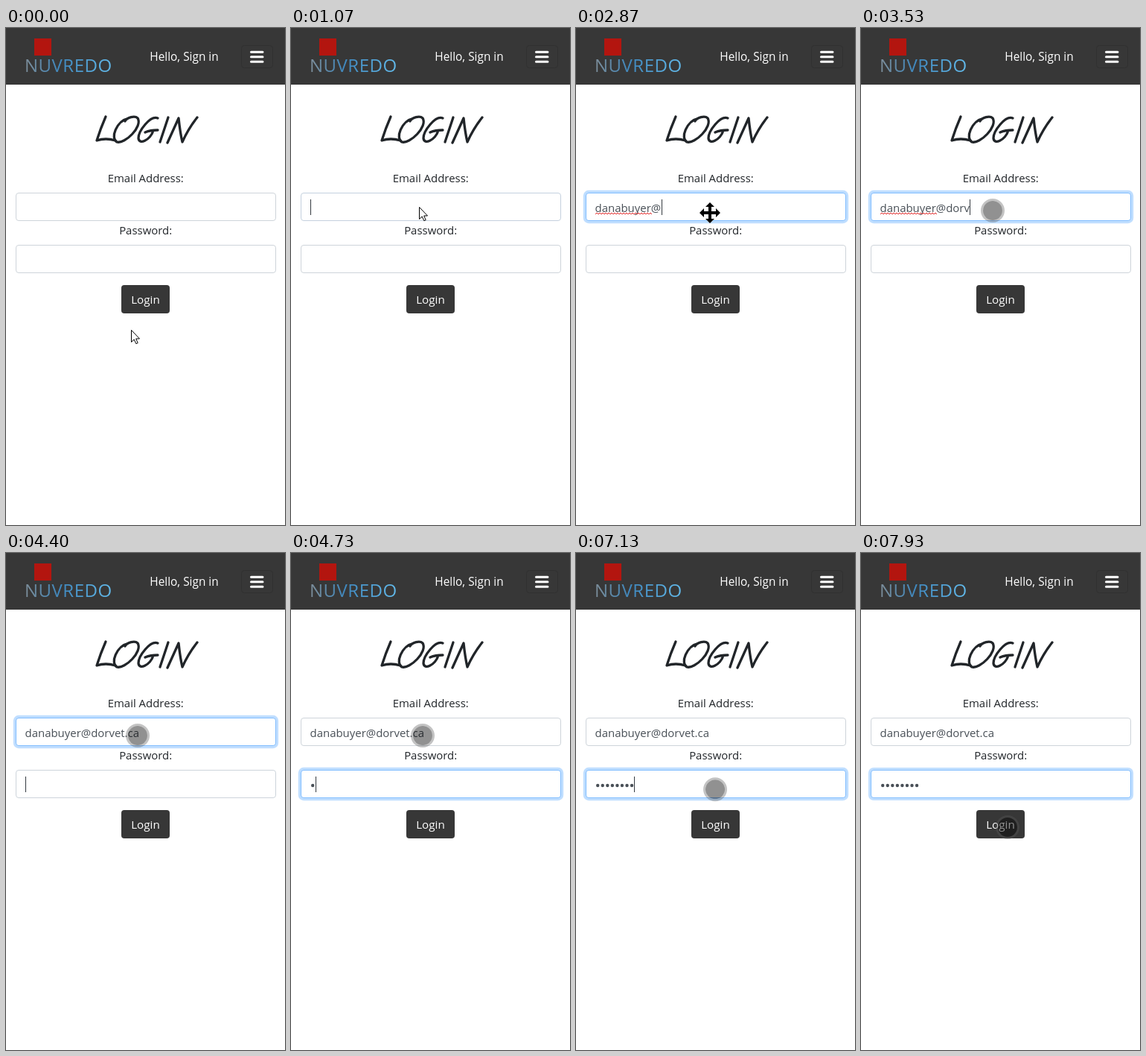
An HTML page that plays this animation: 375x667 px, repeating every 8000 ms.

```html
<!DOCTYPE html>
<html lang="en">
<head>
<meta charset="utf-8">
<title>Login</title>
<style>
  html, body { margin: 0; height: 100%; overflow: hidden; background: #fff; }
  svg { display: block; font: 14.95px "Open Sans", "Noto Sans", sans-serif; fill: #212529; }
  .mid { text-anchor: middle; }
  .light { fill: #fff; }
  .value { fill: #495057; }
  .field { fill: #fff; }
  .ring { fill: none; }
  .title { fill: none; stroke: #212529; stroke-width: 3.3; stroke-linecap: round; stroke-linejoin: round; }
</style>
</head>
<body>
<svg width="375" height="667" viewBox="0 0 375 667">
  <defs>
    <linearGradient id="brand">
      <stop offset="0" stop-color="#7d8d98"/>
      <stop offset=".4" stop-color="#3f87bd"/>
      <stop offset="1" stop-color="#62b9ea"/>
    </linearGradient>
  </defs>

  <rect width="375" height="76" fill="#373737"/>
  <rect x="38" y="14" width="23" height="23" fill="#b3150f"/>
  <text x="25" y="59" font-size="24" letter-spacing=".5" fill="url(#brand)">NUVREDO</text>
  <text class="mid light" x="239.5" y="44" font-size="15.4">Hello, Sign in</text>
  <rect x="316.5" y="23.5" width="42" height="30" rx="4" fill="none" stroke="#303030"/>
  <path d="M329.5 32.3h15.5m-15.5 6.5h15.5m-15.5 6.5h15.5" stroke="#fff" stroke-width="3" stroke-linecap="round"/>

  <g class="title" role="img" aria-label="Login">
    <path d="M134 119Q127 135 122 151Q134 147 147 151"/>
    <path d="M165 121C148 125 140 148 149 153C160 156 184 132 177 121C173 117 163 120 160 125"/>
    <path d="M204 121C194 117 178 138 178 148C179 157 193 151 198 138M187 140Q194 137 204 137"/>
    <path d="M218 120L207 153"/>
    <path d="M217 154L232 121Q234 140 237 153Q245 135 257 120"/>
  </g>

  <text class="mid" x="187.7" y="207">Email Address:</text>
  <text class="mid" x="187.7" y="277">Password:</text>

  <g id="emailBox">
    <rect class="ring" x="13" y="221" width="350" height="38" rx="4"/>
    <rect class="field" x="13.5" y="221.5" width="349" height="37" rx="3.5"/>
  </g>
  <g id="passwordBox">
    <rect class="ring" x="13" y="291" width="350" height="38" rx="4"/>
    <rect class="field" x="13.5" y="291.5" width="349" height="37" rx="3.5"/>
  </g>
  <text id="email" class="value" x="25.5" y="247"></text>
  <path id="squiggle" fill="none" stroke="#e02b2b"/>
  <g id="dots" class="value"></g>
  <rect id="caret" width="1" height="21" fill="#343a40"/>

  <rect x="155" y="345" width="65" height="38" rx="4" fill="#373737"/>
  <text class="mid light" x="187.5" y="370" font-size="15.2">Login</text>

  <path id="arrow" d="M.5 .5V16.5L4.2 13L6.8 18.7L9.2 17.7L6.7 12H11.5Z" fill="#fff" stroke="#000"/>
  <path id="move" transform="translate(180 248)" stroke="#fff" paint-order="stroke" fill="#000"
    d="M0-14L6-8H2V-2H8V-6L14 0L8 6V2H2V8H6L0 14L-6 8H-2V2H-8V6L-14 0L-8-6V-2H-2V-8H-6Z"/>
  <g id="touch">
    <circle r="13" fill="#000" fill-opacity=".43"/>
    <circle r="14.5" fill="none" stroke="#595959" stroke-opacity=".36" stroke-width="3"/>
  </g>
</svg>
<script>
const LOOP = 8000;
const ADDRESS = "danabuyer@dorvet.ca";
const emailKeys = [1530, 1670, 1800, 1930, 2130, 2270, 2330, 2470, 2600, 2800,
  3070, 3400, 3470, 3530, 3670, 3730, 3870, 4000, 4070];
const passwordKeys = [4730, 4870, 5070, 5270, 5470, 5600, 5730, 5930];
const FOCUS_EMAIL = 1040, FOCUS_PASSWORD = 4390, BLUR = 7915;

// Pointer paths: [time, x, y]
const arrowPath = [[30, 168, 405], [130, 169, 383], [270, 173, 300], [400, 175, 222],
  [470, 175, 211], [540, 173, 232], [600, 172, 240]];
const touchPath = [[7030, 177, 245], [7070, 180, 265], [7130, 187, 317], [7200, 191, 338],
  [7330, 195, 357], [7530, 197, 368]];

const $ = id => document.getElementById(id);
const typed = (keys, t) => keys.filter(k => k <= t).length;
const show = (el, on) => el.setAttribute("visibility", on ? "visible" : "hidden");
const smooth = (t, start) => {
  const p = Math.min(1, Math.max(0, (t - start) / 150));
  return p * p * (3 - 2 * p);
};

function along(path, t) {
  const i = path.findIndex(p => p[0] > t);
  if (i < 0) return path.at(-1).slice(1);
  if (i === 0) return path[0].slice(1);
  const [a, b] = [path[i - 1], path[i]];
  const p = (t - a[0]) / (b[0] - a[0]);
  return [1, 2].map(k => a[k] + (b[k] - a[k]) * p);
}

function place(el, x, y) {
  el.setAttribute("transform", `translate(${x} ${y})`);
}

function setFocus(box, amount) {
  const [ring, field] = box.children;
  const mix = (a, b) => a + (b - a) * amount;
  ring.setAttribute("stroke", `rgba(0,123,255,${0.25 * amount})`);
  ring.setAttribute("stroke-width", 6.4 * amount);
  field.setAttribute("stroke", `rgb(${mix(206, 128)},${mix(212, 189)},${mix(218, 255)})`);
}

$("squiggle").setAttribute("d", "M26 250" + "l2-2l2 2".repeat(19));
$("dots").innerHTML = passwordKeys.map((_, i) =>
  `<circle cx="${29.2 + 6.55 * i}" cy="312" r="2.2"/>`).join("");

function draw(t) {
  setFocus($("emailBox"), smooth(t, FOCUS_EMAIL) - smooth(t, FOCUS_PASSWORD));
  setFocus($("passwordBox"), smooth(t, FOCUS_PASSWORD) - smooth(t, BLUR));

  const letters = typed(emailKeys, t), dots = typed(passwordKeys, t);
  $("email").textContent = ADDRESS.slice(0, letters);
  [...$("dots").children].forEach((dot, i) => show(dot, i < dots));
  show($("squiggle"), t >= 2800 && t < FOCUS_PASSWORD);

  const inPassword = t >= FOCUS_PASSWORD;
  const blinkOn = t < 5925 || Math.floor((t - 5925) / 500) % 2 === 0;
  show($("caret"), t >= FOCUS_EMAIL && t < BLUR && blinkOn);
  const textWidth = letters ? $("email").getComputedTextLength() : 0;
  $("caret").setAttribute("x", Math.round(26 + (inPassword ? 6.55 * dots : textWidth)));
  $("caret").setAttribute("y", inPassword ? 300 : 230);

  show($("arrow"), t < 2870);
  show($("move"), t >= 2870 && t < 3200);
  show($("touch"), t >= 3200);
  place($("arrow"), ...along(arrowPath, t));
  place($("touch"), ...along(touchPath, t));
}

function tick() {
  draw(performance.now() % LOOP);
  requestAnimationFrame(tick);
}
tick();
</script>
</body>
</html>
```
